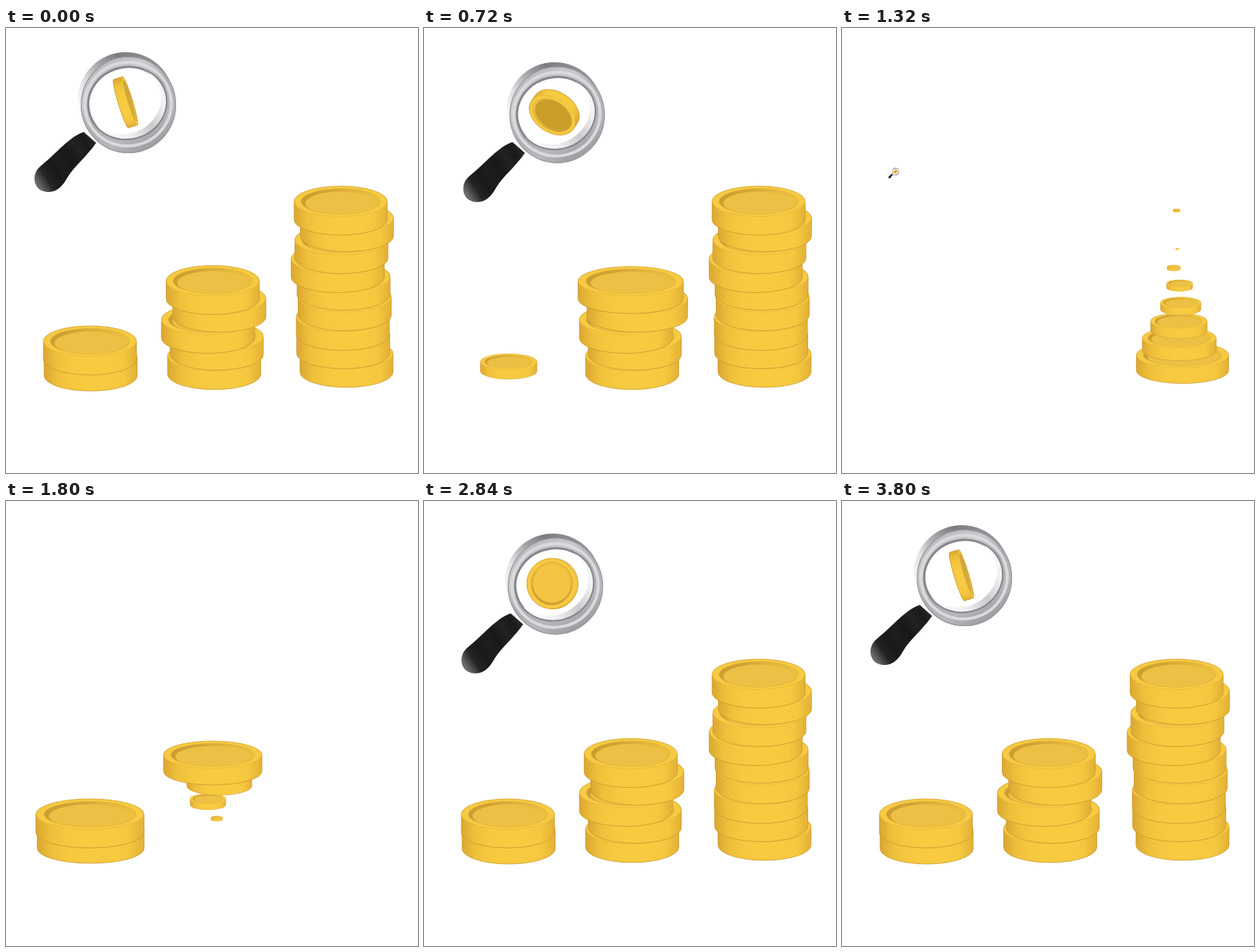
An HTML page with a canvas for the animation above (4000 ms loop, 562 px wide and 608 px high).

```html
<!DOCTYPE html>
<html lang="en">
<head>
<meta charset="utf-8">
<title>Coin stacks</title>
<style>
  html, body { margin: 0; width: 100%; height: 100%; overflow: hidden; background: #fff; }
  canvas { display: block; }
</style>
</head>
<body>
<canvas id="stage" width="562" height="608"></canvas>
<script>
const ctx = document.getElementById('stage').getContext('2d');
const LOOP = 4000, FRAME = 40, SWITCH = 1500;

// Coins from top to bottom as [x, y]; start and stagger of both phases in ms
const stacks = [
  { hide: [421, 160], show: [1645, 18], coins: [[114.5, 440.5], [115.5, 462.5]] },
  { hide: [640, 45], show: [1671, 34],
    coins: [[282, 358], [291, 382], [275.5, 411], [287.5, 434], [284, 460.5]] },
  { hide: [1049, 22], show: [2080, 35],
    coins: [[456.5, 249.5], [465, 272], [457.5, 302], [452.5, 328], [460.5, 352],
            [462, 380], [459.5, 407], [460, 432], [464.5, 457.5]] }
];

const ease = p => (1 - Math.cos(Math.PI * p)) / 2;

// Width overshoots to 1.18 and settles; height only grows to 1
function pop(u, rise, settle) {
  if (u <= 0) return [0, 0];
  if (u < rise) {
    const grown = (u / rise) ** 1.35;
    return [1.18 * grown, grown];
  }
  if (u < rise + settle) return [1.18 - 0.18 * ease((u - rise) / settle), 1];
  return [1, 1];
}

function scaleAt(t, hideStart, showStart) {
  if (t >= SWITCH) return pop(t - showStart, 140, 70);
  const u = t - hideStart;
  if (u > 250 && u < 300) {           // small rebound after vanishing
    const s = 0.08 * Math.sin(Math.PI * (u - 250) / 50);
    return [s, s];
  }
  return pop(240 - u, 165, 75);
}

function gradient(x0, y0, x1, y1, colors) {
  const g = ctx.createLinearGradient(x0, y0, x1, y1);
  colors.forEach((c, i) => g.addColorStop(i / (colors.length - 1), c));
  return g;
}

function oval(x, y, rx, ry, fill, stroke, width = 1, turn = 0) {
  ctx.beginPath();
  ctx.ellipse(x, y, rx, ry, turn, 0, 7);
  if (fill) { ctx.fillStyle = fill; ctx.fill(); }
  if (stroke) { ctx.strokeStyle = stroke; ctx.lineWidth = width; ctx.stroke(); }
}

// Short cylinder whose visible face points up in the local frame
function disc(r, ry, h, face) {
  const top = -h / 2;
  ctx.beginPath();
  ctx.ellipse(0, top, r, ry, 0, Math.PI, 0);
  ctx.ellipse(0, -top, r, ry, 0, 0, Math.PI);
  ctx.closePath();
  ctx.fillStyle = gradient(-r, 0, r, 0,
    ['#dba731', '#efc03b', '#f5c83f', '#f7ca40', '#f7ca40', '#f7ca40', '#f5c73e', '#e2b036']);
  ctx.fill();
  ctx.strokeStyle = '#c9992f';
  ctx.lineWidth = 0.8;
  ctx.stroke();
  oval(0, top, r - 0.5, Math.max(0, ry - 0.5), '#f6cb43', '#e9ba3c', 0.8);
  ctx.save();
  oval(0, top, r * 0.85, ry * 0.83,
    gradient(-r, 0, r, 0, ['#cb9b2f', '#d2a233', '#e4b63c', '#f0c23f']), '#dfaf38', 0.8);
  ctx.clip();
  oval(0, top + h * 0.1, r * 0.76, ry * 0.76, face);
  ctx.restore();
}

function drawStacks(t) {
  for (const { coins, hide, show } of stacks) {
    for (let i = coins.length - 1; i >= 0; i--) {
      const [sx, sy] = scaleAt(t, hide[0] + i * hide[1], show[0] + i * show[1]);
      if (sx < 0.005) continue;
      ctx.save();
      ctx.translate(...coins[i]);
      ctx.scale(sx, sy);
      disc(63.5, 21, 25, '#ecc044');
      ctx.restore();
    }
  }
}

function drawSpinningCoin(t) {
  const turn = (84 + 360 * Math.min(1, Math.max(0, t - 40) / 3760)) * Math.PI / 180;
  const sin = Math.sin(turn), cos = Math.cos(turn);
  const normal = [sin, 0.1 * sin - 0.45 * (1 - cos), cos];
  const length = Math.hypot(...normal) * (cos < 0 ? -1 : 1);
  const [x, y, z] = normal.map(v => v / length);
  const light = 53 + 8 * z ** 4 - 12 * Math.max(0, y);
  ctx.save();
  ctx.translate(163, 101.5);
  ctx.rotate(Math.atan2(y, x) + Math.PI / 2);
  disc(34.5, 34.5 * z, 13 * Math.sqrt(1 - z * z), `hsl(44, ${60 + 30 * z ** 4}%, ${light}%)`);
  ctx.restore();
}

function drawHandle() {
  ctx.beginPath();
  ctx.moveTo(106, 142);
  ctx.bezierCurveTo(86, 149, 70, 170, 48, 188);
  ctx.bezierCurveTo(33, 199, 37, 223, 56, 224);
  ctx.bezierCurveTo(71, 225, 78, 214, 84, 204);
  ctx.bezierCurveTo(93, 189, 108, 178, 123, 157);
  ctx.closePath();
  ctx.fillStyle = gradient(38, 205, 122, 150,
    ['#6b696d', '#262423', '#1b1918', '#1f1d1b', '#1a1817', '#242220', '#1c1a19', '#302e2d']);
  ctx.fill();
}

function drawRing() {
  const hole = () => ctx.ellipse(165.5, 102.5, 53, 48.5, -0.25, 0, 7);
  // Barrel behind the front rim
  ctx.beginPath();
  ctx.ellipse(163.5, 99, 65.5, 66, 0, 0, 7);
  hole();
  ctx.fillStyle = gradient(98, 110, 190, 40,
    ['#fafafa', '#e2e2e4', '#a8a8ac', '#7c7c81', '#8d8d92']);
  ctx.fill('evenodd');
  // Front rim
  ctx.beginPath();
  ctx.ellipse(167, 105, 65, 66, 0, 0, 7);
  hole();
  ctx.fillStyle = gradient(125, 45, 205, 165,
    ['#b9b9bd', '#cbcbce', '#adadb1', '#b8b8bc', '#98989d']);
  ctx.fill('evenodd');
  oval(167, 105, 64.4, 65.4, null, '#97979c', 1.2);
  oval(166.5, 104, 59, 57, null, '#dadadd', 4, -0.25);
  oval(165.5, 102.5, 53.5, 49, null, '#85858b', 3, -0.25);
  // Soft reflection on the inner wall
  ctx.save();
  ctx.beginPath();
  hole();
  ctx.clip();
  const wall = new Path2D();
  wall.rect(90, 30, 150, 150);
  wall.ellipse(160, 98, 52, 47, -0.25, 0, 7);
  ctx.fillStyle = gradient(135, 150, 218, 105, ['#fafafa', '#f0f0f1', '#cbcbce', '#f4f4f5']);
  ctx.fill(wall, 'evenodd');
  ctx.restore();
}

function drawMagnifier(t) {
  const [s] = scaleAt(t, 1102, 2125);
  if (s < 0.005) return;
  const swing = 15 * ease((t < SWITCH + 200 ? t - 40 : t - 2300) / 750);
  ctx.save();
  ctx.translate(62 + swing, 201 + swing * 0.93);
  ctx.scale(s, s);
  ctx.translate(-62, -201);
  drawHandle();
  drawRing();
  drawSpinningCoin(t);
  ctx.restore();
}

function draw(now) {
  let t = Math.floor(now % LOOP / FRAME) * FRAME;
  if (t < 80 || t > 3800) t = 3800;
  ctx.clearRect(0, 0, 562, 608);
  drawStacks(t);
  drawMagnifier(t);
  requestAnimationFrame(() => draw(performance.now() - start));
}

const start = performance.now();
draw(0);
</script>
</body>
</html>
```
